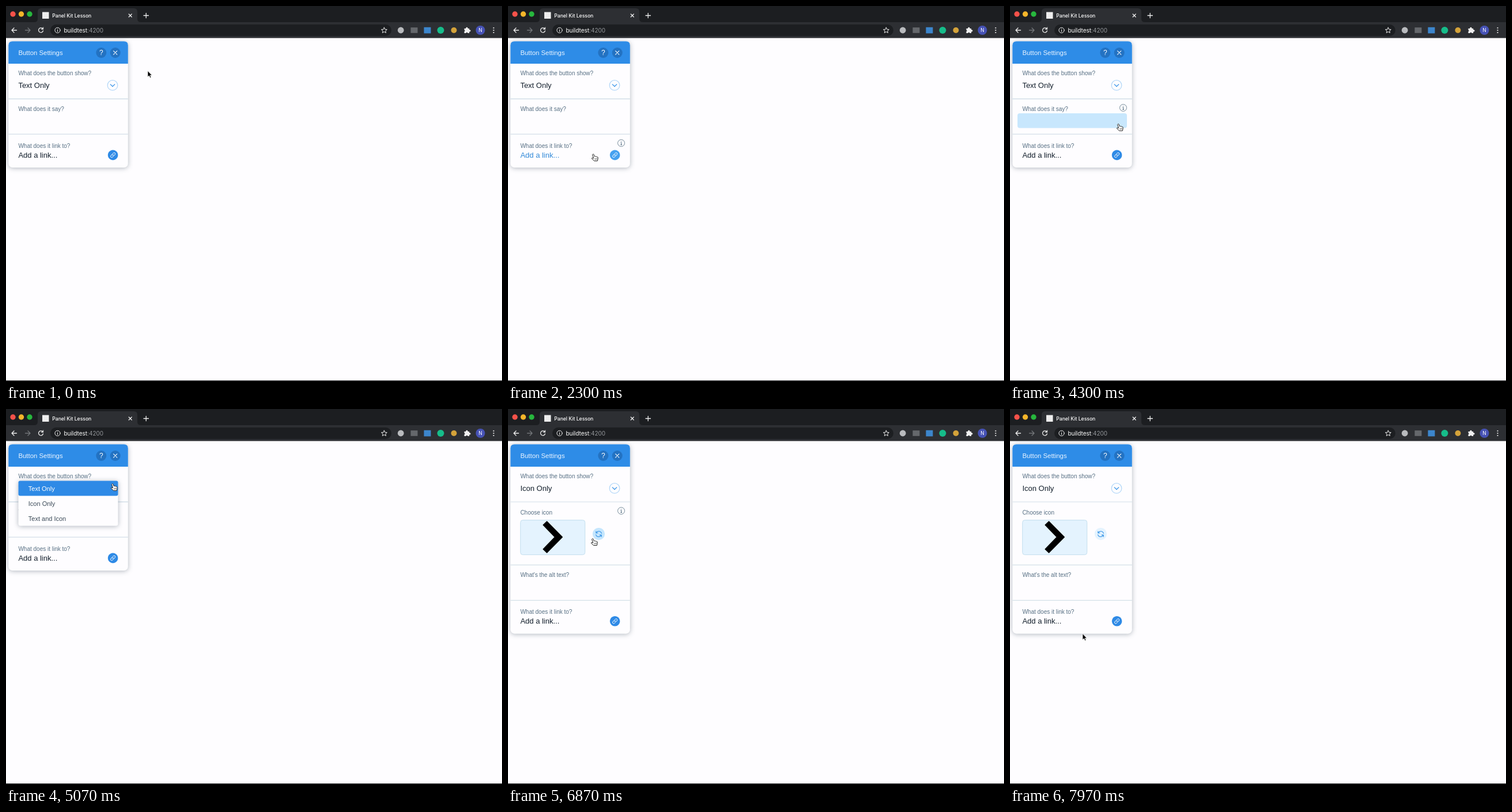
Recreate the animation shown at these times as an HTML page. Size 861x650 px, loop 8000 ms.

```html
<!DOCTYPE html>
<html lang="en">
<head>
<meta charset="utf-8">
<title>Button settings</title>
<style>
  html, body { margin: 0; width: 100%; height: 100%; overflow: hidden; background: #fefdff; }
  svg { display: block; }
  text { font-family: "Liberation Sans", Arial, sans-serif; white-space: pre; }
  .chrome text { font-family: Inter, sans-serif; fill: #fff; }
  .line { fill: none; stroke-linecap: round; stroke-linejoin: round; }
  .label { font-size: 10px; fill: #566f83; }
  .value { font-size: 13px; fill: #131f2c; }
  .option { font-size: 11px; fill: #3b4a58; }
  .divider { stroke: #d3e0e7; stroke-width: 1.2; }
  .shadow { filter: drop-shadow(0 1px 4px rgba(22, 45, 61, .34)); }
  .info { fill: none; stroke: #667d8e; stroke-width: .9; }
  .hot .value { fill: #3189d8; }
  .hot .ring { stroke: #5eaaf0; }
  .hot .linkButton { fill: #45a1f0; }
  .hot .refreshButton { fill: #c5e6fd; }
  .picked rect { fill: #2e8ae6; }
  .picked text { fill: #fff; }
</style>
</head>
<body>
<svg width="861" height="650" viewBox="0 0 861 650">
  <defs>
    <g id="infoIcon" class="info">
      <circle r="6"/><path d="M-1 -.8H.2V3M-1.2 3H1.5M0 -3.4V-2.3" stroke-width="1.1"/>
    </g>
  </defs>

  <rect width="861" height="650" fill="#fefdff"/>
  <rect y="649" width="861" height="1" fill="#202124"/>

  <g class="chrome">
    <rect width="861" height="55.5" fill="#1c1e21"/>
    <path d="M0 28H49Q55 28 55 22V10Q55 4 61 4H222Q228 4 228 10V22Q228 28 234 28H861V55H0Z" fill="#2d2f33"/>
    <rect x="77" y="32" width="592" height="20" rx="10" fill="#1c1e21"/>
    <circle cx="12" cy="14" r="4.7" fill="#f4524a"/>
    <circle cx="26.5" cy="14" r="4.7" fill="#f5b52a"/>
    <circle cx="41" cy="14" r="4.7" fill="#27b73d"/>
    <rect x="63" y="10.5" width="11.5" height="11.5" fill="#eee"/>
    <text x="80.3" y="19.6" font-size="8.6" font-weight="500">Panel Kit Lesson</text>
    <text x="100.4" y="45.5" font-size="10">buildtest<tspan fill="#96999d">:4200</tspan></text>
    <g class="line" stroke="#eee" stroke-width="1.3">
      <path d="M213.2 14L218.2 19M218.2 14L213.2 19M239 16.5H247.4M243.2 12.3V20.7"/>
      <path d="M18.5 42H10M14 38L10 42L14 46"/>
      <path d="M33.5 42H42M38 38L42 42L38 46" stroke="#73767a"/>
      <path d="M64.4 43A4 4 0 1 1 63.4 39.1"/>
      <path d="M64.8 37V40.6H61.2Z" fill="#eee" stroke-width=".5"/>
      <circle cx="89.5" cy="42" r="4.6" stroke-width="1"/>
      <path d="M89.5 41.5V44.3M89.5 39.5V39.6" stroke-width="1.1"/>
      <path d="M656.5 37.2L657.9 40.4L661.4 40.8L658.8 43.1L659.5 46.5L656.5 44.7L653.5 46.5L654.2 43.1L651.6 40.8L655.1 40.4Z" stroke-width="1"/>
    </g>
    <circle cx="685.3" cy="42" r="5.4" fill="#b9bbbe"/>
    <rect x="702.5" y="37.2" width="12" height="9.6" fill="#65686c"/>
    <rect x="725.5" y="36.8" width="12" height="10.6" fill="#3c86cc"/>
    <circle cx="754.5" cy="42" r="6" fill="#16bd8a"/>
    <circle cx="777.5" cy="42" r="5" fill="#d4a33a"/>
    <path d="M795.5 39H798.4A1.7 1.7 0 1 1 801.6 39H804.2V41.3A1.7 1.7 0 1 1 804.2 44.4V47H801.6A1.7 1.7 0 0 0 798.4 47H795.5V44.4A1.7 1.7 0 0 0 795.5 41.3Z" fill="#f1f1f1"/>
    <circle cx="823.5" cy="42" r="8" fill="#4652b5"/>
    <text x="823.5" y="45" font-size="8.5" text-anchor="middle">N</text>
    <path class="line" d="M846.5 38V38.01M846.5 42V42.01M846.5 46V46.01" stroke="#eee" stroke-width="2.2"/>
  </g>

  <rect id="panel" class="shadow" x="4.3" y="61.3" width="207.5" height="218.7" rx="7" fill="#fefdff"/>
  <path d="M4.3 100V68.3Q4.3 61.3 11.3 61.3H204.8Q211.8 61.3 211.8 68.3V100Z" fill="#2e8ce7"/>
  <text x="21.4" y="85" font-size="11.4" fill="#eaf4ff">Button Settings</text>
  <circle cx="165.3" cy="81" r="9" fill="#2372c2"/>
  <circle cx="189.7" cy="81" r="9" fill="#2372c2"/>
  <text x="165.3" y="85.2" font-size="12" fill="#fff" text-anchor="middle">?</text>
  <path class="line" d="M186.6 77.9L192.8 84.1M192.8 77.9L186.6 84.1" stroke="#fff" stroke-width="1.1"/>

  <g id="showRow">
    <text class="label" x="21.4" y="120.4">What does the button show?</text>
    <text class="value" id="showValue" x="21.4" y="142"></text>
    <circle class="ring" cx="185" cy="137.4" r="8.8" fill="none" stroke="#b5d8f8" stroke-width="1.3"/>
    <path class="line" d="M181.2 135.8L185 139.5L188.8 135.8" stroke="#4098e9" stroke-width="1.2"/>
  </g>
  <path class="divider" d="M4.3 161H211.8"/>

  <g id="iconRow">
    <text class="label" x="21.4" y="183.1">Choose icon</text>
    <rect x="21.7" y="192.6" width="112" height="60" rx="4" fill="#e4f3fe" stroke="#bfdcec" stroke-width=".9"/>
    <path d="M67.5 195L94.2 222L67.5 249L61.2 243L81.5 222L61.2 201Z" stroke="#000" stroke-width="1.6" stroke-linejoin="round"/>
    <circle class="refreshButton" cx="157.5" cy="216.6" r="10.6" fill="#e4f3fe"/>
    <path class="line" d="M152.8 212V215H155.8M153 215A5 5 0 0 1 162.4 215.6M162.2 221.4V218.4H159.2M162 218.4A5 5 0 0 1 152.6 217.8" stroke="#3693e6" stroke-width="1.1"/>
    <use id="iconInfo" href="#infoIcon" x="196.5" y="176.4"/>
  </g>

  <g id="lower">
    <path class="divider" d="M4.3 161H211.8M4.3 222.2H211.8"/>
    <rect id="inputHover" x="13" y="186" width="190" height="25.6" rx="4" fill="#c8e7fd"/>
    <text class="label" id="inputLabel" x="21.4" y="181.6"></text>
    <use id="inputInfo" href="#infoIcon" x="196.5" y="176.4"/>
    <g id="linkRow">
      <text class="label" x="21.4" y="245.6">What does it link to?</text>
      <text class="value" x="21.4" y="262.8">Add a link...</text>
      <circle class="linkButton" cx="185.6" cy="258.4" r="8.8" fill="#2e8ae6"/>
      <g class="line" transform="translate(185.6 258.4) rotate(-45)" stroke="#fff" stroke-width=".9">
        <path d="M-1 -2H-3A2 2 0 0 0 -3 2H-.6A2 2 0 0 0 1.2 0M1 2H3A2 2 0 0 0 3 -2H.6A2 2 0 0 0 -1.2 0"/>
      </g>
    </g>
    <use id="linkInfo" href="#infoIcon" x="196.5" y="237.6"/>
  </g>

  <g id="menu">
    <rect class="shadow" x="21.5" y="124.6" width="173" height="78" rx="4" fill="#fefdff"/>
  </g>

  <g id="cursor">
    <path id="arrow" d="M0 0V10.6L2.5 8.3L4.1 12L5.9 11.2L4.3 7.6H7.4Z" stroke="#fff" stroke-width=".7"/>
    <g id="hand" class="line" stroke="#222" stroke-width="1">
      <path fill="#fff" d="M-1.3 1.3Q-.4 -.5 1 1.2L2.2 4.8Q3.8 3.8 4.6 5Q6 4.3 6.7 5.6Q8 5.2 8.2 6.8L8 9.6L7.2 12.4H1.8L-2.4 8.6Q-3 6.9 -1 7.2L.3 7.8Z"/>
      <path d="M3 8.3V10.2M4.7 8.1V10.1M6.3 7.9V9.9" stroke-width=".6"/>
    </g>
  </g>
</svg>
<script>
const LOOP = 8000, MENU_OPENS = 4950, ICON_CHOSEN = 5980, GROWTH = 109.4;
const el = id => document.getElementById(id);
const show = (id, on) => el(id).style.display = on ? '' : 'none';
const heat = (id, on) => el(id).classList.toggle('hot', on);

// Pointer tip over time: [ms, x, y]
const path = [
  [0, 246, 112.5], [450, 245, 113], [950, 205, 128], [1430, 163, 134], [1700, 161, 146],
  [2000, 154, 202], [2300, 148, 256], [2500, 148, 272], [2850, 149, 293], [3150, 151, 298],
  [3400, 154, 297], [3800, 168, 262], [4300, 188, 204], [4700, 187, 150], [5070, 185, 129],
  [5450, 165, 140], [5800, 124, 161], [6100, 122, 164], [6500, 136, 204], [6870, 147, 224],
  [7200, 143, 292], [7500, 134, 358], [7970, 126, 389.5], [8000, 126, 389.5]
];

const slope = (i, axis) => {
  const a = path[Math.max(i - 1, 0)], b = path[Math.min(i + 1, path.length - 1)];
  return (b[axis] - a[axis]) / (b[0] - a[0]);
};

function pointerAt(t) {
  const i = path.findIndex((p, k) => k && t <= p[0]) - 1;
  const a = path[i], b = path[i + 1], span = b[0] - a[0], u = (t - a[0]) / span;
  return [1, 2].map(axis => {
    const rise = u * u * (3 - 2 * u);
    return a[axis] + (b[axis] - a[axis]) * rise
      + span * u * (1 - u) * ((1 - u) * slope(i, axis) - u * slope(i + 1, axis));
  });
}

const options = ['Text Only', 'Icon Only', 'Text and Icon'].map((name, i) => {
  const y = 124.6 + 26 * i;
  el('menu').insertAdjacentHTML('beforeend',
    `<g><rect x="21.5" y="${y}" width="173" height="26" rx="${i === 1 ? 0 : 3}" fill="none"/>
     <text class="option" x="38.8" y="${y + 17.2}">${name}</text></g>`);
  return el('menu').lastElementChild;
});

function render(t) {
  const [x, y] = pointerAt(t);
  const iconMode = t >= ICON_CHOSEN, menuOpen = t >= MENU_OPENS && !iconMode;
  const shift = iconMode ? GROWTH : 0;
  const within = (x0, x1, y0, y1) => x > x0 && x < x1 && y > y0 && y < y1;
  const over = (...box) => !menuOpen && within(...box);
  const section = (y0, y1) => over(4, 212, y0, y1);

  const overShow = over(13, 203, 124, 152);
  const overInput = over(13, 203, 186 + shift, 211.6 + shift);
  const overLink = over(13, 203, 246 + shift, 272 + shift);
  const overRefresh = iconMode && Math.hypot(x - 157.5, y - 216.6) < 14;
  const overMenu = menuOpen && within(21, 195, 124, 203);

  el('showValue').textContent = iconMode ? 'Icon Only' : 'Text Only';
  el('inputLabel').textContent = iconMode ? "What's the alt text?" : 'What does it say?';
  el('panel').setAttribute('height', 218.7 + shift);
  el('lower').setAttribute('transform', `translate(0 ${shift})`);
  heat('showRow', overShow);
  heat('linkRow', overLink);
  heat('iconRow', overRefresh);
  show('iconRow', iconMode);
  show('inputHover', overInput);
  show('iconInfo', section(161, 270));
  show('inputInfo', section(161 + shift, 222 + shift));
  show('linkInfo', section(222 + shift, 280 + shift));

  show('menu', menuOpen);
  const picked = overMenu ? Math.floor((y - 124.6) / 26) : 0;
  options.forEach((option, i) => option.classList.toggle('picked', i === picked));

  const clickable = overShow || overInput || overLink || overRefresh || overMenu;
  show('hand', clickable);
  show('arrow', !clickable);
  el('cursor').setAttribute('transform', `translate(${x} ${y})`);
}

function tick(now) {
  render(now % LOOP);
  requestAnimationFrame(tick);
}
render(0);
requestAnimationFrame(tick);
</script>
</body>
</html>
```
